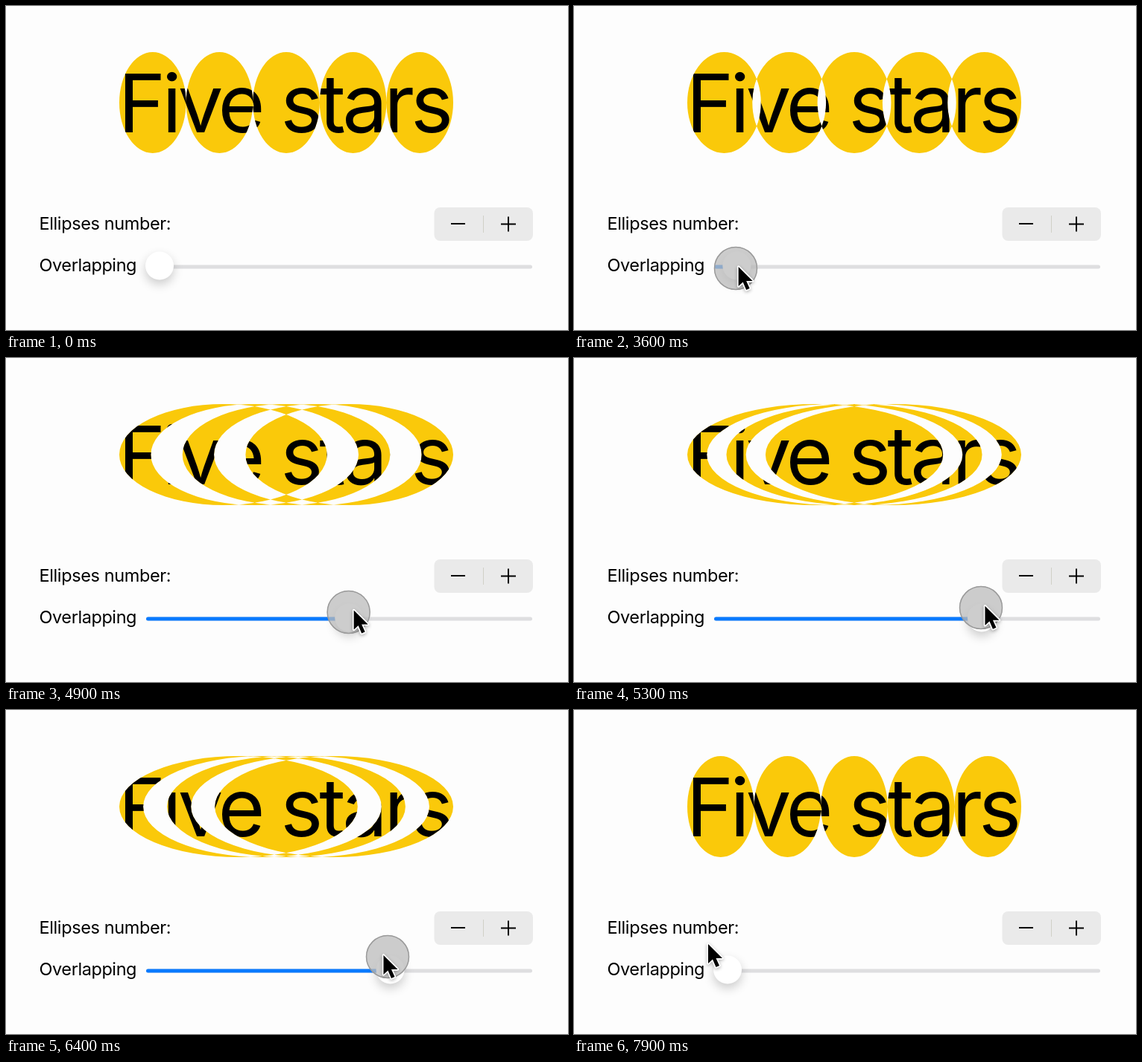
These frames come from a looping animation (754 px wide and 436 px high, 8 s). An HTML page with a canvas:

```html
<!DOCTYPE html>
<html lang="en">
<head>
<meta charset="utf-8">
<title>Overlapping ellipses</title>
<style>
  html, body { margin: 0; width: 100%; height: 100%; overflow: hidden; background: #fdfdfd; }
  canvas { display: block; width: 754px; height: 436px; }
</style>
</head>
<body>
<canvas id="stage"></canvas>
<script>
const W = 754, H = 436, LOOP = 8000, STEP = 100;
const FONT = 'Inter, Roboto, "Liberation Sans", sans-serif';
const BOX = { x: 152, y: 62, w: 448, h: 136 };
const TRACK = { x: 188, y: 348.5, w: 518, h: 5 };
const THUMB = { min: 206, max: 688, y: 349.5, r: 19 };
const COUNT = 5, PRESS = 3400, RELEASE = 7800, ENTER = 2800;

// [time, x, y]
const approach = [[2800, 410, 381], [3000, 300, 362], [3200, 211, 350]];
const drag = [
  [3400, 204, 353], [3600, 217, 353], [4000, 267, 351], [4400, 341, 350],
  [5300, 546, 336], [5950, 618, 334], [6400, 512, 332], [7000, 346, 329],
  [7500, 232, 326], [7800, 204, 325]
];

const canvas = document.getElementById('stage');
const ctx = canvas.getContext('2d');
const dpr = window.devicePixelRatio || 1;
canvas.width = W * dpr;
canvas.height = H * dpr;

const clamp = (v, lo, hi) => Math.min(hi, Math.max(lo, v));

// Smooth path through timed points (cubic Hermite).
function along(keys, t) {
  const last = keys.length - 1;
  t = clamp(t, keys[0][0], keys[last][0]);
  let i = 0;
  while (i < last - 1 && t > keys[i + 1][0]) i++;
  const a = keys[i], b = keys[i + 1], dt = b[0] - a[0], u = (t - a[0]) / dt;
  const slope = (k, c) => {
    if (k === 0 || k === last) return 0;
    const before = keys[k][c] - keys[k - 1][c], after = keys[k + 1][c] - keys[k][c];
    if (before * after <= 0) return 0;
    return (before + after) / (keys[k + 1][0] - keys[k - 1][0]);
  };
  const at = c => (1 + 2 * u) * (1 - u) ** 2 * a[c] + u * (1 - u) ** 2 * dt * slope(i, c)
    + u * u * (3 - 2 * u) * b[c] + u * u * (u - 1) * dt * slope(i + 1, c);
  return { x: at(1), y: at(2) };
}

function fillBox(x, y, w, h, r, color) {
  ctx.fillStyle = color;
  ctx.beginPath();
  ctx.roundRect(x, y, w, h, r);
  ctx.fill();
}

function disc(x, y, r) {
  ctx.beginPath();
  ctx.arc(x, y, r, 0, Math.PI * 2);
  ctx.fill();
}

// Even tracking brings the line to its natural measure.
function text(str, x, y, size, measure) {
  ctx.font = `400 ${size}px ${FONT}`;
  ctx.fillStyle = '#000';
  ctx.letterSpacing = '0px';
  const spare = measure - ctx.measureText(str).width;
  ctx.letterSpacing = `${spare / (str.length - 1)}px`;
  ctx.fillText(str, x, y);
}

function title(overlap) {
  const step = BOX.w / COUNT * (1 - overlap);
  const rx = (BOX.w - step * (COUNT - 1)) / 2;
  const ry = BOX.h / 2, cy = BOX.y + ry;
  ctx.save();
  ctx.beginPath();
  for (let i = 0; i < COUNT; i++) {
    const cx = BOX.x + rx + i * step;
    ctx.moveTo(cx + rx, cy);
    ctx.ellipse(cx, cy, rx, ry, 0, 0, Math.PI * 2);
  }
  ctx.clip('evenodd');
  ctx.fillStyle = '#fac90a';
  ctx.fillRect(BOX.x, BOX.y, BOX.w, BOX.h);
  text('Five stars', 150.5, 169.5, 108, 449.5);
  ctx.restore();
}

function stepper() {
  fillBox(574.5, 271, 132.5, 45, 8, '#eaeaea');
  ctx.fillStyle = '#d0d0c6';
  ctx.fillRect(640, 282, 1, 23);
  ctx.fillStyle = '#000';
  ctx.fillRect(597, 292, 19, 2);
  ctx.fillRect(664, 292.5, 20, 2);
  ctx.fillRect(673, 283.5, 2, 20);
}

function slider(x) {
  fillBox(TRACK.x, TRACK.y, TRACK.w, TRACK.h, 2.5, '#dedee0');
  if (x > THUMB.min) fillBox(TRACK.x, TRACK.y, x - TRACK.x, TRACK.h, 2.5, '#0a7aff');
  ctx.save();
  ctx.shadowColor = 'rgba(0, 0, 0, 0.2)';
  ctx.shadowBlur = 14 * dpr;
  ctx.shadowOffsetY = 6 * dpr;
  ctx.fillStyle = '#fff';
  disc(x, THUMB.y, THUMB.r);
  ctx.restore();
}

function touch({ x, y }) {
  ctx.fillStyle = 'rgba(188, 188, 188, 0.75)';
  disc(x, y, 29);
  ctx.strokeStyle = '#9a9a9a';
  ctx.lineWidth = 1.5;
  ctx.beginPath();
  ctx.arc(x, y, 28.5, 0, Math.PI * 2);
  ctx.stroke();
}

function pointer({ x, y }) {
  const arrow = new Path2D('M0 1V27L6 21.5L10.5 32L15 30L10.5 20H19Z');
  ctx.save();
  ctx.translate(x, y);
  ctx.lineJoin = 'round';
  ctx.lineWidth = 3.5;
  ctx.strokeStyle = '#fff';
  ctx.shadowColor = 'rgba(0, 0, 0, 0.3)';
  ctx.shadowBlur = 4 * dpr;
  ctx.shadowOffsetY = 1.5 * dpr;
  ctx.stroke(arrow);
  ctx.shadowColor = 'transparent';
  ctx.fillStyle = '#000';
  ctx.fill(arrow);
  ctx.restore();
}

function pointerAt(t) {
  if (t < PRESS) return along(approach, t);
  if (t > RELEASE) return { x: 180, y: 314 };
  const p = along(drag, t + 25);
  return { x: p.x + 1, y: p.y - 3 };
}

// The thumb is held slightly off centre and trails the finger a little.
function thumbAt(t) {
  return clamp(along(drag, t - 6).x + 2, THUMB.min, THUMB.max);
}

function draw(t) {
  const pressed = t >= PRESS && t <= RELEASE;
  const x = pressed ? thumbAt(t) : THUMB.min;

  ctx.setTransform(dpr, 0, 0, dpr, 0, 0);
  ctx.fillStyle = '#fdfdfd';
  ctx.fillRect(0, 0, W, H);
  title((x - THUMB.min) / (THUMB.max - THUMB.min));
  text('Ellipses number:', 44.5, 301, 23.5, 177);
  text('Overlapping', 44.5, 357, 23.5, 131);
  stepper();
  slider(x);
  if (pressed) touch(along(drag, t));
  if (t >= ENTER) pointer(pointerAt(t));
}

const start = performance.now();
function tick() {
  const t = (performance.now() - start) % LOOP;
  draw(Math.floor(t / STEP) * STEP);
  requestAnimationFrame(tick);
}
tick();
</script>
</body>
</html>
```
